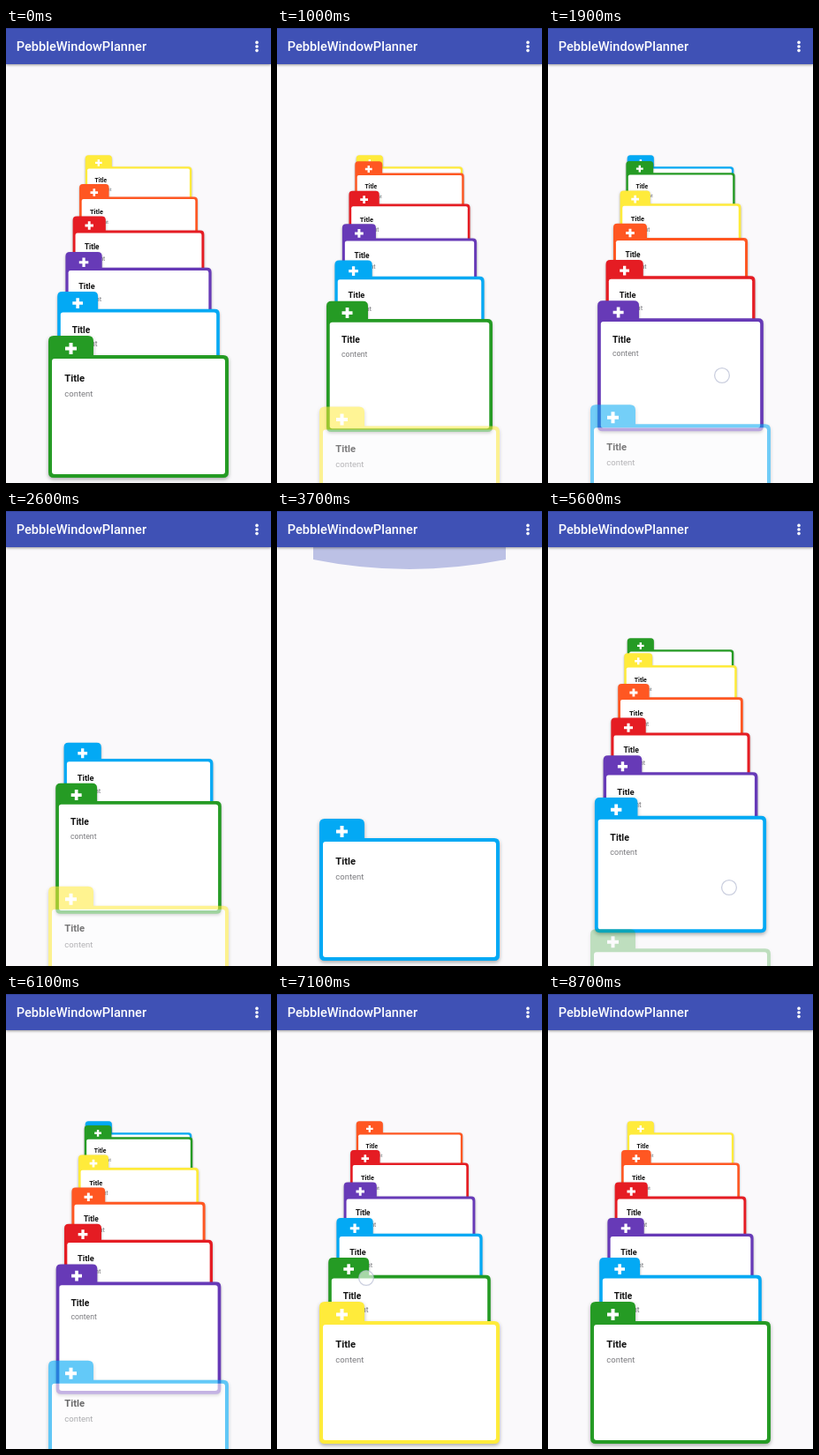
An HTML page for the animation above (8800 ms loop, 300 by 516 pixels).

```html
<!DOCTYPE html>
<html lang="en">
<head>
<meta charset="utf-8">
<title>Card stack</title>
<style>
  html, body { margin: 0; width: 100%; height: 100%; overflow: hidden; background: #faf9fb; }
  svg { display: block; width: 100vw; height: 100vh; font-family: Roboto, sans-serif; }
  .card { filter: drop-shadow(0 2px 2px rgba(0, 0, 0, .32)); }
  .bar { filter: drop-shadow(0 1px 1.5px rgba(0, 0, 0, .4)); }
  .title { font-size: 11.2px; font-weight: 700; fill: #111; }
  .content { font-size: 9.5px; fill: #7b7b7f; }
  .heading { font-size: 14.6px; font-weight: 500; fill: #fff; }
</style>
</head>
<body>
<svg viewBox="0 0 300 516">
  <rect width="300" height="516" fill="#faf9fb"/>
  <g id="stack"></g>
  <path id="glow" d="M41 0V14Q150 36 259 14V0Z" fill="#3f51b5"/>
  <g class="bar">
    <rect width="300" height="41" fill="#3f51b5"/>
    <rect width="300" height="1" fill="#35459f"/>
  </g>
  <text class="heading" x="11.7" y="26.4">PebbleWindowPlanner</text>
  <g fill="#fff">
    <circle cx="284" cy="16.4" r="1.8"/>
    <circle cx="284" cy="21" r="1.8"/>
    <circle cx="284" cy="25.6" r="1.8"/>
  </g>
  <circle id="touch" r="8.4" fill="#fff" fill-opacity=".6" stroke="#a9afc9" stroke-opacity=".6" stroke-width="1.3"/>
</svg>
<script>
const LOOP = 8800, STEP = 100;
const FIRST = -1, LAST = 13, DEPTH = 5;
const SHRINK = 0.9, TRAVEL = 174;
const VANISH = { x: 150, y: -151 };
const COLORS = ['#259b24', '#03a9f4', '#673ab7', '#e51c23', '#ff5722', '#ffeb3b'];

// start ms, end ms, position reached, deceleration power
const MOVES = [
  [300, 500, 0.8, 1], [500, 1600, 7, 2.3],
  [1750, 1900, 7.45, 1], [1900, 3550, 13, 2.3],
  [4250, 4450, 12.2, 1], [4450, 5450, 7, 2.3],
  [5450, 5600, 6.72, 1], [5600, 6850, -1, 2.3],
  [7100, 7300, 0, 1.3]
];

// first ms, last ms, x, y, and the stack position at which the finger is there
const TOUCHES = [
  [400, 500, 197, 385, 0.8],
  [1800, 1900, 197, 394, 7.45],
  [4300, 4400, 205, 400, 12.4],
  [5500, 5600, 205, 427, 6.72],
  [7100, 7100, 101, 322, -1]
];

const byId = id => document.getElementById(id);
const stack = byId('stack'), glow = byId('glow'), touch = byId('touch');
const show = (el, on) => el.setAttribute('display', on ? 'inline' : 'none');

function makeCard(index) {
  const color = COLORS[(index + 6) % 6];
  const g = document.createElementNS('http://www.w3.org/2000/svg', 'g');
  g.innerHTML = `<g class="card">
    <path fill="${color}" d="M48 355q0-6 6-6h39q6 0 6 6v16h147q6 0 6 6v127q0 6-6 6h-192q-6 0-6-6z"/></g>
    <rect x="52" y="375" width="196" height="131" rx="3" fill="#fff"/>
    <path d="M67 363.5h13M73.5 357v13" stroke="#fff" stroke-width="4"/>
    <text class="title" x="66.3" y="400.7">Title</text>
    <text class="content" x="66.3" y="417.8">content</text>`;
  return g;
}

// Back cards come first so that the front ones cover them.
const cards = [];
for (let i = LAST; i >= FIRST; i--) {
  const el = stack.appendChild(makeCard(i));
  cards.push({ i, el });
}

function positionAt(t) {
  let pos = 0;
  for (const [start, end, to, power] of MOVES) {
    if (t <= start) break;
    const p = Math.min(1, (t - start) / (end - start));
    pos += (to - pos) * (1 - Math.pow(1 - p, power));
  }
  return pos;
}

function drawCards(pos) {
  const front = Math.floor(pos + 1e-6);
  const gone = Math.max(0, pos - front);
  for (const { i, el } of cards) {
    const level = i - front;
    const visible = level >= 0 && (level <= DEPTH || (level === DEPTH + 1 && gone > 0.001));
    show(el, visible);
    if (!visible) continue;
    if (level === 0) {
      el.setAttribute('transform', `translate(0 ${gone * TRAVEL})`);
      el.setAttribute('opacity', 1 - gone);
      continue;
    }
    const grown = SHRINK + (1 - SHRINK) * gone * gone;
    const s = level > DEPTH ? SHRINK ** DEPTH : SHRINK ** (level - 1) * grown;
    el.setAttribute('transform',
      `translate(${VANISH.x} ${VANISH.y}) scale(${s}) translate(${-VANISH.x} ${-VANISH.y})`);
    el.setAttribute('opacity', 1);
  }
}

function drawGlow(t) {
  const rise = (t - 3400) / 250, fall = (4100 - t) / 400;
  const g = Math.max(0, Math.min(1, rise, fall));
  show(glow, g > 0);
  glow.setAttribute('transform', `translate(0 41) scale(1 ${g})`);
  glow.setAttribute('opacity', 0.33 * g);
}

function drawTouch(t, pos) {
  const hit = TOUCHES.find(([from, to]) => t >= from && t <= to);
  show(touch, hit);
  if (!hit) return;
  const [, , x, y, at] = hit;
  touch.setAttribute('cx', x);
  touch.setAttribute('cy', y + (pos - at) * TRAVEL);
}

const origin = performance.now();
function frame() {
  const elapsed = (performance.now() - origin) % LOOP;
  const t = Math.floor(elapsed / STEP) * STEP;
  const pos = positionAt(t);
  drawCards(pos);
  drawGlow(t);
  drawTouch(t, pos);
  requestAnimationFrame(frame);
}
frame();
</script>
</body>
</html>
```
